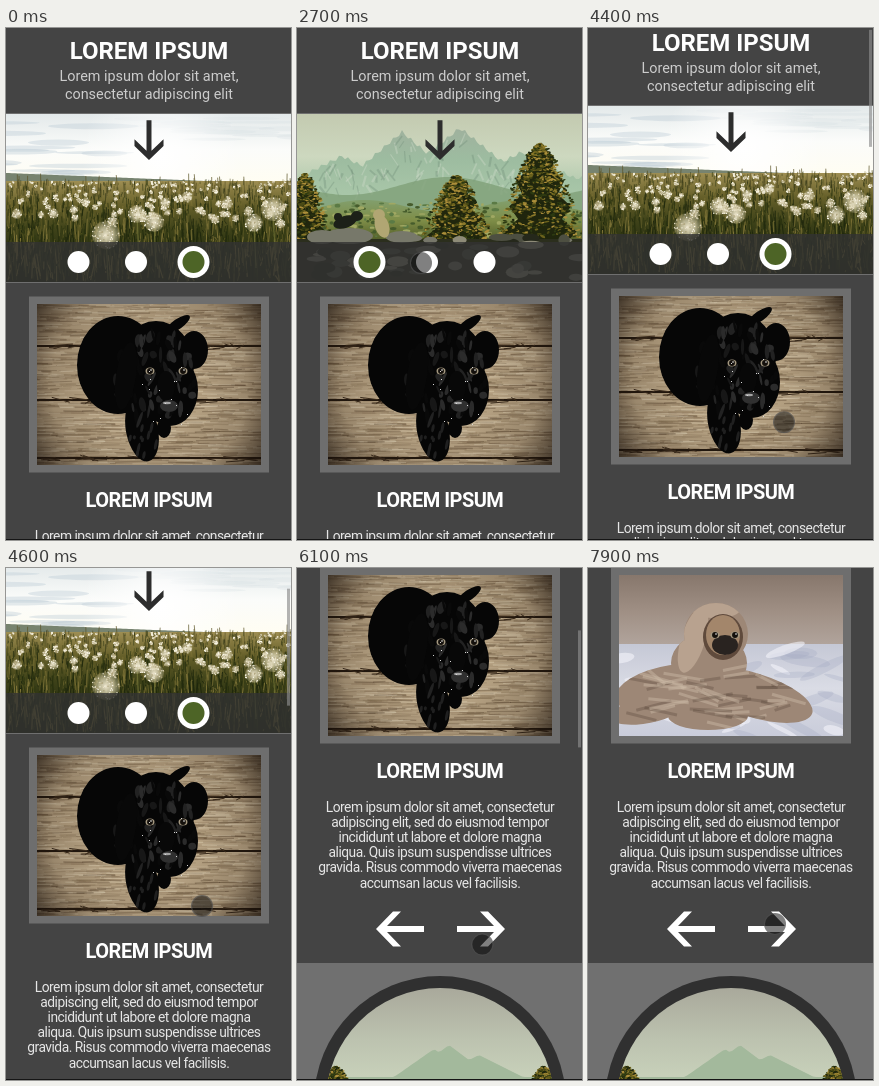
An HTML page with a canvas for the animation above (8000 ms loop, 285 by 512 pixels).

```html
<!DOCTYPE html>
<html lang="en">
<head>
<meta charset="utf-8">
<title>Lorem ipsum</title>
<style>
html, body { margin: 0; width: 100%; height: 100%; overflow: hidden; background: #444; }
#stage { position: relative; width: 285px; height: 512px; overflow: hidden; background: #444; }
#page, #page > * { position: absolute; left: 0; top: 0; }
svg { font-family: Roboto, Arial, sans-serif; text-anchor: middle; fill: #fff; }
.head { font-weight: 700; }
.tight { letter-spacing: -.5px; }
#bar, #cursor, #edge { position: absolute; }
#bar { left: 281px; top: 0; width: 3px; height: 117px; background: rgba(140, 140, 140, .65); }
#cursor {
  left: -11px; top: -11px; width: 22px; height: 22px; box-sizing: border-box; border-radius: 50%;
  background: rgba(12, 12, 12, .52); border: 1.5px solid rgba(125, 125, 125, .4);
}
#edge { left: 0; top: 511px; width: 285px; height: 1px; background: #151515; }
</style>
</head>
<body>
<div id="stage">
  <div id="page">
    <canvas id="art" width="285" height="790"></canvas>
    <svg width="285" height="790">
      <g id="text"></g>
      <rect y="214" width="285" height="40" fill="#323232" fill-opacity=".8"/>
      <g id="dots"></g>
      <rect id="tap" y="218" width="57" height="32" fill="rgb(51,181,229)" fill-opacity=".4"/>
      <g id="arrows"></g>
    </svg>
  </div>
  <div id="bar"></div>
  <div id="cursor"></div>
  <div id="edge"></div>
</div>
<script>
const $ = id => document.getElementById(id);
const LOOP = 8000, TICK = 100;
const dotX = i => 72.5 + 57.5 * i;

// Motion: each move is [end time, duration, ...values]
const smooth = p => p * p * (3 - 2 * p);
const flick = p => smooth(p ** 1.24);
function track(start, moves, ease) {
  return t => moves.reduce((from, [end, span, ...to]) => {
    const p = ease(Math.min(1, Math.max(0, (t - end + span) / span)));
    return from.map((v, i) => v + (to[i] - v) * p);
  }, start);
}
const pointer = track([168, -12], [
  [600, 500, 92, 386], [1000, 400, 130, 236], [1500, 200, 72, 237], [2500, 400, 117, 235],
  [2700, 100, 124, 235], [3400, 300, 184, 239], [4200, 500, 196, 414], [4600, 300, 196, 338],
  [5200, 100, 196, 363], [5600, 400, 183, 420], [5900, 200, 183, 382], [6300, 300, 192, 361],
  [6800, 200, 189, 348], [7200, 200, 187, 356]
], smooth);
const scroller = track([0], [[4900, 600, 230], [5900, 200, 269]], flick);
const TAPS = [[0, 2], [1200, 1], [1900, 0], [2900, 1], [3600, 2]];
const PHOTOS = [[0, 0], [6300, 1], [7400, 2]];
const holdAt = (table, t) => table.filter(row => row[0] <= t).pop();

// Drawing helpers
function random(seed) {
  return (a = 0, b = 1) => {
    seed = (seed * 16807) % 2147483647;
    return a + (b - a) * seed / 2147483647;
  };
}
const pick = (r, list) => list[Math.floor(r(0, list.length))];
const times = (n, fn) => { for (let i = 0; i < n; i++) fn(i); };
function make(x, y, w, h, draw) {
  const c = document.createElement('canvas');
  c.width = w; c.height = h;
  const g = c.getContext('2d');
  g.translate(-x, -y);
  draw(g, random(w + y));
  return c;
}
function fade(g, y0, y1, ...colors) {
  const f = g.createLinearGradient(0, y0, 0, y1);
  colors.forEach((c, i) => f.addColorStop(i / (colors.length - 1), c));
  return f;
}
function glow(g, x, y, r, ...colors) {
  const f = g.createRadialGradient(x, y, 0, x, y, r);
  colors.forEach((c, i) => f.addColorStop(i / (colors.length - 1), c));
  return f;
}
function box(g, color, x, y, w, h) { g.fillStyle = color; g.fillRect(x, y, w, h); }
function oval(g, color, x, y, rx, ry = rx, turn = 0) {
  g.fillStyle = color;
  g.beginPath(); g.ellipse(x, y, rx, ry, turn, 0, 7); g.fill();
}
function line(g, color, width, x0, y0, x1, y1) {
  g.strokeStyle = color; g.lineWidth = width;
  g.beginPath(); g.moveTo(x0, y0); g.lineTo(x1, y1); g.stroke();
}
// One figure joined from ovals
function figure(g, color, ...parts) {
  const path = new Path2D();
  for (const [x, y, rx, ry, turn = 0] of parts) {
    const part = new Path2D();
    part.ellipse(x, y, rx, ry, turn, 0, 7);
    path.addPath(part);
  }
  g.fillStyle = color; g.fill(path);
  return path;
}
// Land below a skyline given as a function of x
function ridge(g, color, top, bottom) {
  g.fillStyle = color;
  g.beginPath(); g.moveTo(0, bottom);
  for (let x = 0; x <= 285; x += 3) g.lineTo(x, top(x));
  g.lineTo(285, bottom); g.fill();
}
function tree(g, r, x, top, base, w) {
  const h = base - top;
  g.fillStyle = '#20260d';
  g.beginPath(); g.moveTo(x, top);
  times(8, i => g.lineTo(x + w * (i % 2 ? .55 : .85) * Math.sqrt((i + 1) / 8), top + h * (i + 1) / 8));
  times(8, i => g.lineTo(x - w * (i % 2 ? .85 : .55) * Math.sqrt((8 - i) / 8), base - h * i / 8));
  g.fill();
  times(w * 17, () => {
    const k = r(), reach = w * k ** .6;
    oval(g, pick(r, ['#2d3a12', '#4a4a15', '#6b621d', '#8c7a2b', '#1d250d', '#ad8f3b']),
      x + r(-1, 1) * reach, top + h * k, r(.8, 3), r(.5, 1.3), r(-.5, .5));
  });
}

// Banner scenes
const peak = (x, at, height, slope) => Math.max(0, height - Math.abs(x - at) * slope);
const mountains = (g, r) => {
  box(g, fade(g, 86, 214, '#c3cab0', '#cdd8bf', '#a5c3a6', '#87a879'), 0, 86, 285, 168);
  const alps = x => 150 - Math.max(peak(x, 105, 46, .85), peak(x, 163, 50, .8), peak(x, 45, 22, .5), peak(x, 225, 26, .5))
    + 2 * Math.sin(x * .7);
  ridge(g, fade(g, 98, 165, '#9fb09d', '#9dbca0', '#a8c6a8'), alps, 200);
  times(100, () => {
    const x = r(20, 260), y = alps(x) + r(2, 30);
    line(g, pick(r, ['rgba(205,217,200,.4)', 'rgba(104,133,112,.3)']), r(1, 2.5), x, y, x + r(-9, 9), y + r(5, 12));
  });
  ridge(g, 'rgba(128,161,121,.8)', x => 158 + 9 * Math.sin(x / 32), 215);
  ridge(g, fade(g, 170, 214, '#82a070', '#7f8e48', '#4f5a27'), x => 178 + 6 * Math.sin(x / 25 + 2), 216);
  times(260, () => oval(g, pick(r, ['#5b7a45', '#a0a863', '#465c2c']), r(0, 285), r(175, 212), r(1, 4), r(.6, 2)));
  tree(g, r, 8, 146, 213, 28);
  tree(g, r, 160, 148, 216, 38);
  tree(g, r, 243, 116, 216, 46);
  box(g, '#2b2e1d', 0, 211, 285, 43);
  times(55, () => oval(g, pick(r, ['#77776a', '#4d4f41', '#8e8b78', '#25281b']), r(0, 285), r(207, 250), r(5, 13), r(2, 6)));
  figure(g, '#77786a', [52, 208, 24, 8], [25, 209, 15, 7], [105, 209, 16, 6]);
  figure(g, '#1c2018', [48, 194, 12, 6, -.3], [60, 188, 6, 5], [41, 189, 4, 4]);
  figure(g, '#b1a673', [82, 187, 6, 6], [85, 198, 7, 12, -.3]);
};
const lake = g => {
  box(g, fade(g, 86, 254, '#bcc5bd', '#d9d8c7', '#7c8970', '#343d2b'), 0, 86, 285, 168);
  ridge(g, '#7f8f80', x => 136 + 12 * Math.sin(x / 38), 200);
  ridge(g, '#55653f', x => 165 + 6 * Math.sin(x / 30 + 1), 200);
  box(g, fade(g, 188, 254, '#88967f', '#34402f'), 0, 188, 285, 66);
};
function puff(g, r, x, y, s) {
  oval(g, glow(g, x, y, s, '#e9e2c9', 'rgba(221,213,181,.75)', 'rgba(200,190,150,.25)'), x, y, s);
  times(s * 5, () => {
    const a = r(0, 6.3), d = Math.sqrt(r()) * s;
    oval(g, pick(r, ['#fbf8e9', '#e9e1c8', '#a89d73']), x + Math.cos(a) * d, y + Math.sin(a) * d, .7);
  });
}
const dandelions = (g, r) => {
  box(g, fade(g, 86, 156, '#e3e9ea', '#fbfcfa', '#fffdf2'), 0, 86, 285, 70);
  times(30, () => {
    const x = r(-20, 300);
    oval(g, x < 110 ? 'rgba(188,203,212,.4)' : 'rgba(214,222,225,.35)', x, r(90, x < 110 ? 148 : 112), r(20, 55), r(1, 3.5));
  });
  box(g, glow(g, 155, 128, 80, '#fff', 'rgba(255,255,255,0)'), 60, 86, 200, 70);
  ridge(g, '#77836f', x => 145 + x * .04, 160);
  box(g, fade(g, 151, 254, '#a39256', '#66602a', '#3d4118', '#262d11', '#222810'), 0, 153, 285, 101);
  times(2200, () => {
    const k = r(), y = 156 + 98 * k, x = r(0, 285);
    line(g, pick(r, ['#1f270d', '#333a14', '#555321', '#7e7337', '#29310f']), .5 + .7 * k,
      x, y, x + r(-4, 4) * k, y - r(2, 6 + 24 * k));
  });
  times(45, () => {
    const x = r(0, 285), y = r(145, 157);
    line(g, '#5c5529', .7, x, y, x + r(-2, 2), 168);
  });
  times(150, () => {
    const k = r() ** 1.8;
    puff(g, r, r(0, 285), 154 + 36 * k, 1 + 2.6 * k);
  });
  times(12, i => puff(g, r, 18 + i * 23 + r(-8, 8), r(168, 196), r(4, 6)));
  for (const [x, y, s] of [[267, 181, 12], [100, 207, 14], [131, 186, 9], [148, 194, 10], [248, 195, 9]]) {
    line(g, '#686a30', 1.2, x, y, x + 2, y + 45);
    puff(g, r, x, y, s);
  }
};

// Framed pictures
function eyes(g, y, x0, x1, size) {
  for (const x of [x0, x1]) {
    oval(g, '#a3977f', x, y, size, size * .8);
    oval(g, '#14100c', x, y, size * .65);
    oval(g, '#fff', x + 1, y - 1, .8);
  }
}
const dog = (g, r) => {
  box(g, '#b7a384', 31, 276, 224, 161);
  times(1500, () => {
    const x = r(0, 255), y = r(276, 437);
    line(g, pick(r, ['rgba(70,50,30,.3)', 'rgba(226,212,186,.4)', 'rgba(130,108,80,.3)']), r(.5, 1.6), x, y, x + r(6, 40), y + r(-1, 1));
  });
  for (const y of [318, 372, 430]) {
    line(g, '#20160d', 2, 31, y, 255, y);
    times(22, () => { const x = r(31, 235); line(g, '#3a2b1c', 1, x, y + r(-3, 4), x + r(5, 20), y + r(-2, 3)); });
  }
  box(g, glow(g, 143, 356, 148, 'rgba(40,26,14,0)', 'rgba(40,26,14,0)', 'rgba(36,24,14,.2)', 'rgba(20,13,8,.9)'), 31, 276, 224, 161);
  const coat = figure(g, '#060606', [112, 337, 41, 49], [150, 338, 38, 45], [188, 322, 14, 19], [164, 362, 28, 36],
    [172, 296, 14, 5, -.6], [136, 402, 16, 32, -.2], [158, 400, 7, 10]);
  g.save();
  g.clip(coat);
  times(75, () => {
    const a = r(0, 6.3), d = Math.sqrt(r());
    oval(g, pick(r, ['#171717', '#222', '#2b2b2b', '#090909']), 150 + Math.cos(a) * d * 40, 350 + Math.sin(a) * d * 46, r(1, 4), r(3, 9), r(-.6, .6));
  });
  times(12, () => oval(g, '#202020', r(124, 150), r(398, 428), 1.5, r(2, 6), .2));
  g.restore();
  figure(g, '#080808', [120, 348, 10, 34, .15], [160, 358, 9, 15]);
  eyes(g, 343, 144, 177, 4.5);
  oval(g, '#303030', 163, 378, 9, 6);
  oval(g, '#a5a5a5', 161, 375, 4, 1.2);
  times(15, () => box(g, '#d8d8d8', Math.round(r(134, 186)), Math.round(r(334, 400)), 1, 1));
};
const forest = (g, r) => {
  box(g, fade(g, 7, 168, '#46583d', '#414a38', '#302d28'), 31, 7, 224, 161);
  figure(g, '#5c5246', [178, 70, 26, 28], [155, 125, 90, 45]);
  times(34, () => line(g, 'rgba(30,40,27,.65)', r(1, 4), r(31, 255), 7, r(31, 255), r(45, 70)));
  times(1000, i => {
    const y = r(7, 148), w = (75 - y * .2) * r();
    oval(g, pick(r, ['#30472a', '#527039', '#22321c', '#6d8a4c']), i % 2 ? 31 + w : 255 - w, y, r(1, 4), r(.8, 2.5), r(0, 3));
  });
  times(600, () => oval(g, pick(r, ['#6d5c50', '#362d27', '#8a7b6e', '#25201c']), r(31, 255), r(105, 168), r(1, 3.5), r(.6, 1.5), r(0, 3)));
  const wrap = figure(g, '#cdc6b8', [143, 45, 19, 26], [143, 82, 25, 40], [141, 122, 44, 30],
    [107, 131, 29, 16, -.2], [182, 113, 26, 14, .1], [160, 145, 24, 13, .3]);
  g.save();
  g.clip(wrap);
  const plaid = ['rgba(105,106,109,.5)', 'rgba(201,150,145,.45)', 'rgba(245,241,229,.7)'];
  times(17, i => {
    const x = 78 + i * 9;
    line(g, plaid[i % 3], 2, 140 + (x - 143) * .25, 18, x, 165);
    line(g, plaid[i % 3], 2, 70, 28 + i * 9, 215, 34 + i * 9);
  });
  figure(g, 'rgba(94,87,79,.3)', [122, 92, 7, 34, .4], [165, 105, 5, 28, -.5]);
  g.restore();
  oval(g, '#4a3d33', 143, 39, 14, 16);
  oval(g, '#a88d6e', 143, 38, 11, 13);
  oval(g, '#231e1b', 143, 45, 7);
  eyes(g, 36, 137, 149, 3);
};
const bed = (g, r) => {
  box(g, fade(g, 7, 85, '#87776c', '#a19186', '#b5a9a2'), 31, 7, 224, 80);
  box(g, fade(g, 72, 168, '#c3c6d4', '#dadce5', '#c9ccda'), 31, 76, 224, 92);
  times(44, () => oval(g, pick(r, ['rgba(243,244,250,.6)', 'rgba(157,165,190,.28)']), r(31, 255), r(80, 168), r(10, 28), r(2, 6), r(-.5, .5)));
  const wrap = figure(g, '#9d8776', [128, 66, 32, 31], [121, 95, 38, 30], [85, 122, 58, 25, -.15],
    [165, 127, 62, 22, .3], [60, 142, 38, 13, -.2], [120, 148, 40, 14]);
  g.save();
  g.clip(wrap);
  figure(g, '#b8a28f', [105, 72, 12, 34, .3], [128, 42, 24, 8]);
  times(46, () => {
    const x = r(35, 190), y = r(100, 155);
    line(g, pick(r, ['rgba(82,63,51,.3)', 'rgba(205,186,167,.45)']), 3, x, y, x + r(15, 45), y + r(-10, 15));
  });
  g.restore();
  oval(g, '#5f4a3c', 135, 69, 20, 23);
  oval(g, '#a3866b', 135, 67, 17, 20);
  oval(g, '#292320', 137, 77, 13, 10);
  eyes(g, 67, 127, 147, 4.5);
};

const banners = [mountains, lake, dandelions].map(f => make(0, 86, 285, 168, f));
const photos = [dog, forest, bed].map((f, i) => make(31, i ? 7 : 276, 224, 161, f));

const base = make(0, 0, 285, 790, (g, r) => {
  box(g, '#444', 0, 0, 285, 790);
  box(g, '#6f6f6f', 0, 85, 285, 170);
  box(g, '#6e6e6e', 23, 268.5, 240, 176);
  box(g, '#707070', 0, 664, 285, 126);
  oval(g, '#303030', 143, 803, 126);
  g.beginPath(); g.arc(143, 803, 114, 0, 7); g.clip();
  box(g, fade(g, 689, 790, '#a9a99b', '#bcc2af', '#cbd5bd'), 0, 680, 285, 110);
  ridge(g, '#a3b99c', x => 778 - Math.max(peak(x, 137, 28, .7), peak(x, 152, 32, .75), peak(x, 182, 22, .5)), 790);
  tree(g, r, 39, 768, 800, 19);
  tree(g, r, 247, 768, 800, 22);
});

// Text, dots and arrows
const label = (size, y, text, extra) => `<text x="143" y="${y}" font-size="${size}" ${extra}>${text}</text>`;
const PARAGRAPH = [
  'Lorem ipsum dolor sit amet, consectetur', 'adipiscing elit, sed do eiusmod tempor',
  'incididunt ut labore et dolore magna', 'aliqua. Quis ipsum suspendisse ultrices',
  'gravida. Risus commodo viverra maecenas', 'accumsan lacus vel facilisis.'
];
$('text').innerHTML =
  label(24, 31, 'LOREM IPSUM', 'class="head"') +
  label(14.4, 53, 'Lorem ipsum dolor sit amet,', 'fill="#ccc"') +
  label(14.4, 71, 'consectetur adipiscing elit', 'fill="#ccc"') +
  label(20, 479, 'LOREM IPSUM', 'class="head tight"') +
  PARAGRAPH.map((s, i) => label(13.8, Math.round(513 + i * 15.1), s, 'class="tight" fill="#e6e6e6"')).join('');

const ARROW = 'M0 0 17-17.5h8L11-3H48V3H11L25 17.5H17z';
const arrow = (move, fill) => `<path d="${ARROW}" transform="${move}" fill="${fill}"/>`;
$('arrows').innerHTML =
  arrow('translate(143 132) rotate(-90) scale(.83)', '#2d2d2d') +
  arrow('translate(79 630)', '#fff') +
  arrow('translate(208 630) scale(-1 1)', '#fff');
$('dots').innerHTML = [0, 1, 2].map(i => `<circle cx="${dotX(i)}" cy="234" r="11"/>`).join('') +
  '<g id="active"><circle r="16"/><circle r="11" fill="#4d6426"/></g>';

const view = $('art').getContext('2d');

function render(t) {
  const [since, slide] = holdAt(TAPS, t);
  const scroll = Math.round(scroller(t)[0]);
  const [x, y] = pointer(t);
  view.drawImage(base, 0, 0);
  view.drawImage(banners[slide], 0, 86);
  view.drawImage(photos[holdAt(PHOTOS, t)[1]], 31, 276);
  $('active').setAttribute('transform', `translate(${dotX(slide)} 234)`);
  $('tap').setAttribute('x', dotX(slide) - 16);
  $('tap').style.display = since && t < since + 200 ? '' : 'none';
  $('page').style.transform = `translateY(${-scroll}px)`;
  $('bar').style.transform = `translateY(${scroll * .232}px)`;
  $('bar').style.opacity = t >= 4400 && t < 5400 || t >= 5800 && t < 6300 ? 1 : 0;
  $('cursor').style.transform = `translate(${x}px, ${y}px)`;
}
let last = -1;
function loop() {
  const t = Math.floor(performance.now() % LOOP / TICK) * TICK;
  if (t !== last) render(last = t);
  requestAnimationFrame(loop);
}
loop();
</script>
</body>
</html>
```
